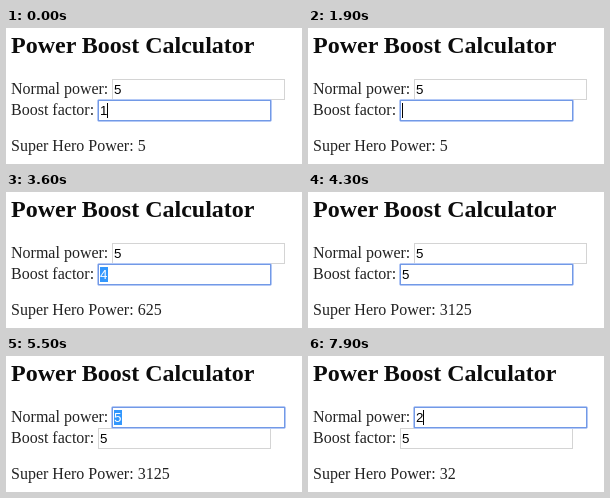
An HTML page for the animation above (8000 ms loop, 296 px wide and 136 px high).

```html
<!DOCTYPE html>
<html lang="en">
<head>
<meta charset="utf-8">
<title>Power Boost Calculator</title>
<style>
  html, body { margin: 0; width: 296px; height: 136px; overflow: hidden; background: #fff; }
  svg { display: block; }
  text { font: 16px "Liberation Serif", "Times New Roman", serif; fill: #222; white-space: pre; }
  .title { font-size: 24px; font-weight: bold; fill: #0c0c0c; }
  .value { font: 13.333px "Liberation Sans", Arial, sans-serif; }
  .box { fill: #fff; stroke: #d4d4d4; }
  .glow { fill: none; stroke: #b4c9f6; }
  .edge { fill: none; stroke: #7299e6; }
  .mark { fill: #3297fd; }
</style>
</head>
<body>
<svg width="296" height="136" viewBox="0 0 296 136">
  <text class="title" x="5" y="25">Power Boost Calculator</text>
  <text x="5" y="66">Normal power:</text>
  <text x="5" y="87">Boost factor:</text>
  <text id="result" x="5" y="123"></text>
  <rect class="box" x="106.5" y="51.5" width="172" height="20"/>
  <rect class="box" x="92.5" y="72.5" width="172" height="20"/>
  <g id="ring">
    <rect class="glow" x="-0.5" y="-0.5" width="174" height="22" rx="1.5"/>
    <rect class="edge" x="0.5" y="0.5" width="172" height="20"/>
  </g>
  <rect id="mark" class="mark" width="8" height="15"/>
  <text id="power" class="value" x="108" y="66"></text>
  <text id="factor" class="value" x="94" y="87"></text>
  <rect id="caret" width="1" height="15"/>
</svg>
<script>
const LOOP = 8000;
const $ = id => document.getElementById(id);
const fields = {
  power: { x: 106, y: 51 },
  factor: { x: 92, y: 72 }
};

// Each step: start in ms, then the properties that change.
const steps = [
  [0, { focus: "factor", power: "5", factor: "1", caret: true, selected: false }],
  [500, { caret: false }],
  [900, { caret: true }],
  [1300, { caret: false }],
  [1900, { factor: "", caret: true }],
  [2100, { factor: "2" }],
  [2700, { caret: false }],
  [2800, { selected: true }],
  [3000, { factor: "3", selected: false, caret: true }],
  [3300, { selected: true, caret: false }],
  [3400, { factor: "4", selected: false, caret: true }],
  [3600, { selected: true, caret: false }],
  [3800, { factor: "5", selected: false, caret: true }],
  [4300, { caret: false }],
  [4900, { caret: true }],
  [5400, { caret: false }],
  [5500, { focus: "power", selected: true }],
  [6900, { power: "2", selected: false, caret: true }],
  [7400, { caret: false }],
  [7900, { caret: true }]
];

function stateAt(t) {
  const state = {};
  for (const [start, change] of steps) {
    if (start <= t) Object.assign(state, change);
  }
  return state;
}

function place(el, x, y) {
  el.setAttribute("transform", `translate(${x} ${y})`);
}

function show(el, on) {
  el.style.display = on ? "" : "none";
}

function render(t) {
  const s = stateAt(t);
  const { x, y } = fields[s.focus];
  const strength = Math.pow(Number(s.power), s.factor === "" ? 1 : Number(s.factor));

  $("result").textContent = "Super Hero Power: " + strength;
  for (const name in fields) {
    $(name).textContent = s[name];
    $(name).style.fill = s.selected && name === s.focus ? "#fff" : "#000";
  }
  place($("ring"), x, y);
  place($("mark"), x + 2, y + 3);
  place($("caret"), x + 2 + 7 * s[s.focus].length, y + 3);
  show($("mark"), s.selected);
  show($("caret"), s.caret);
}

const begin = performance.now();
function tick() {
  render((performance.now() - begin) % LOOP);
  requestAnimationFrame(tick);
}
tick();
</script>
</body>
</html>
```
